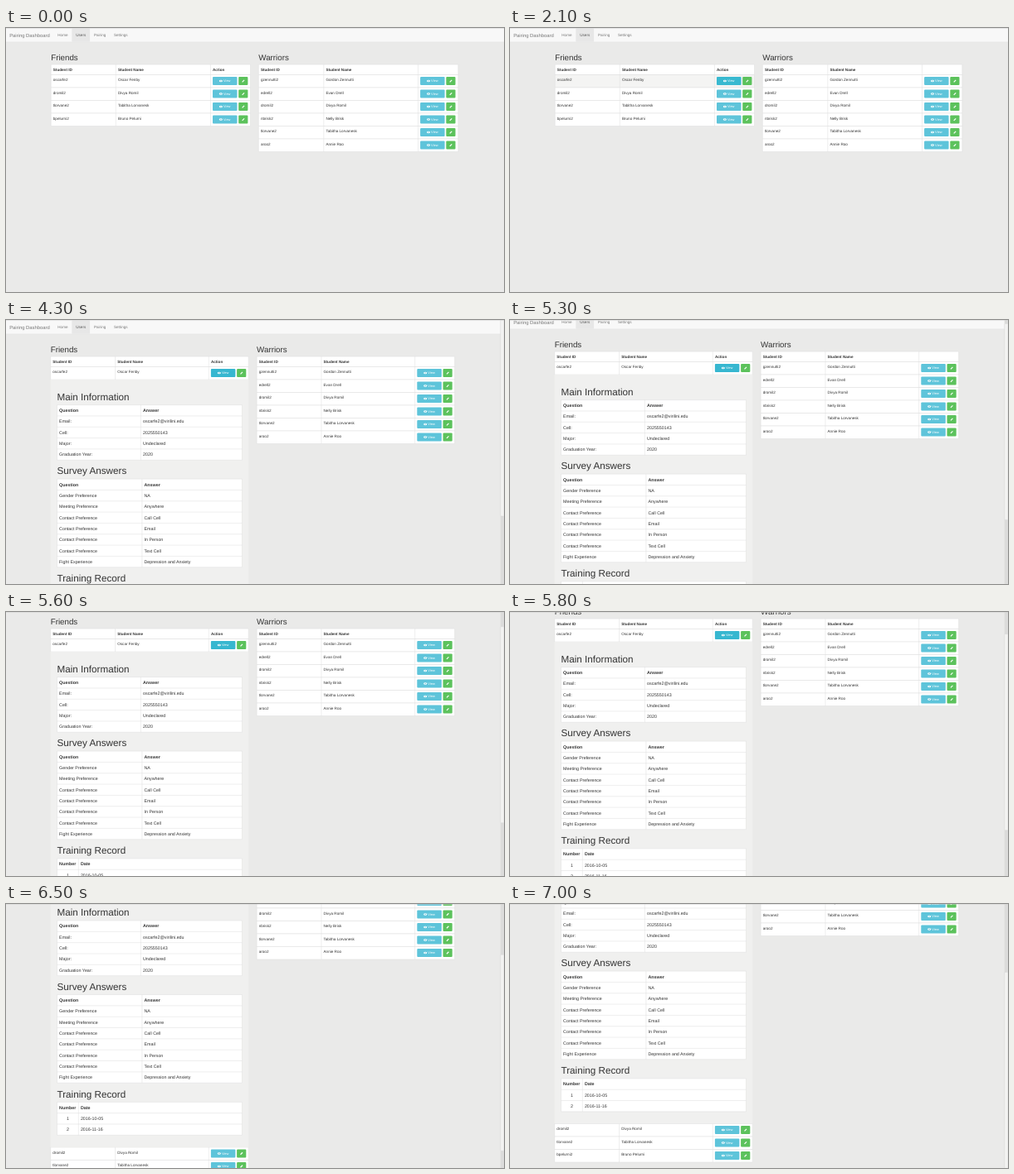
Write an HTML page that moves like this. It is 600x319 px and loops after 8 s.

```html
<!DOCTYPE html>
<html lang="en">
<head>
<meta charset="utf-8">
<title>Pairing Dashboard</title>
<style>
  html, body { margin: 0; width: 100%; height: 100%; overflow: hidden; background: #eaeae9; }
  svg { display: block; }
  text {
    font-family: "Liberation Sans", Arial, sans-serif;
    text-rendering: geometricPrecision;
    fill: #333;
    white-space: pre;
  }
</style>
</head>
<body>
<svg id="stage" width="600" height="319" viewBox="0 0 600 319"></svg>
<script>
const stage = document.getElementById('stage');
const LOOP = 8000, VIEW_H = 319;
const TOP = 44.1, HEAD = 12.4, ROW = 15.5, PAD = 2.6;
const SMALL = 4.62, BODY = 5.33, BODY_ROW = 13.33;
const PANEL_Y = 72, PANEL_H = 304.5;
const LINE = '#dcdcdc';

const friends = [
  ['oscarfe2', 'Oscar Fenby'],
  ['dromil2', 'Divya Romil'],
  ['tlorvane2', 'Tabitha Lorvanesk'],
  ['bpelurni2', 'Bruno Pelurni']
];
const warriors = [
  ['gzennutti2', 'Gordon Zennutti'],
  ['edrell2', 'Evan Drell'],
  friends[1],
  ['nbrisk2', 'Nelly Brisk'],
  friends[2],
  ['aroo2', 'Annie Roo']
];
const mainInfo = [
  ['Question', 'Answer'],
  ['Email:', 'oscarfe2@virilini.edu'],
  ['Cell:', '2025550143'],
  ['Major:', 'Undeclared'],
  ['Graduation Year:', '2020']
];
const survey = [
  ['Question', 'Answer'],
  ['Gender Preference', 'NA'],
  ['Meeting Preference', 'Anywhere'],
  ['Contact Preference', 'Call Cell'],
  ['Contact Preference', 'Email'],
  ['Contact Preference', 'In Person'],
  ['Contact Preference', 'Text Cell'],
  ['Fight Experience', 'Depression and Anxiety']
];
const training = [
  ['Number', 'Date'],
  ['1', '2016-10-05'],
  ['2', '2016-11-16']
];

// Column edges without and with the scrollbar
const wide = {
  friends: [54.2, 132.3, 246.4, 294.5],
  warriors: [304.3, 382.8, 496.5, 544.8],
  splits: [163.4, 165.4]
};
const narrow = {
  friends: [53.7, 131.6, 244.3, 292.2],
  warriors: [302.1, 379.9, 492.7, 540.6],
  splits: [162.4, 163.9]
};

const rect = (x, y, w, h, fill, extra = '') =>
  `<rect x="${x}" y="${y}" width="${w}" height="${h}" fill="${fill}" ${extra}/>`;

// cy is the middle of the line box
const text = (x, cy, str, size, extra = '') =>
  `<text x="${x}" y="${cy + size * 0.3465}" font-size="${size}" ${extra}>${str}</text>`;

const bold = 'font-weight="bold"';

function grid(xs, ys) {
  const x0 = xs[0], x1 = xs[xs.length - 1], y0 = ys[0], y1 = ys[ys.length - 1];
  const d = ys.map(y => `M${x0} ${y}H${x1}`).join('') + xs.map(x => `M${x} ${y0}V${y1}`).join('');
  return `<path d="${d}" stroke="${LINE}" stroke-width=".5" fill="none"/>`;
}

function buttons(x, y, blue) {
  const cy = y + 4.95;
  return rect(x, y, 29.5, 9.9, blue, 'rx="1"') +
    `<ellipse cx="${x + 9.9}" cy="${cy}" rx="2" ry="1.3" fill="#fff"/>` +
    `<circle cx="${x + 9.9}" cy="${cy - 0.1}" r=".65" fill="${blue}"/>` +
    text(x + 13, cy, 'View', 3.95, 'style="fill:#fff"') +
    rect(x + 31.2, y, 11.2, 9.9, '#5cc25c', 'rx="1"') +
    `<path d="M${x + 35.6} ${cy + 1.3}l2.5 -2.5" stroke="#fff" stroke-width="1.2"/>`;
}

function userRow(cols, y, user, state = {}) {
  const [a, b, c, d] = cols, cy = y + 6.2;
  return rect(a, y, d - a, ROW, state.hover ? '#f4f4f3' : '#fff') +
    text(a + PAD, cy, user[0], SMALL) +
    text(b + PAD, cy, user[1], SMALL) +
    buttons(c + PAD, y + 2.6, state.blue || '#5ec4da') +
    grid(cols, [y, y + ROW]);
}

function userHead(cols, title, last) {
  const [a, b, c, d] = cols, cy = TOP + 6.1;
  return text(a, 35.5, title, 9.77) +
    rect(a, TOP, d - a, HEAD, '#fff') +
    text(a + PAD, cy, 'Student ID', SMALL, bold) +
    text(b + PAD, cy, 'Student Name', SMALL, bold) +
    text(c + PAD, cy, last, SMALL, bold) +
    grid(cols, [TOP, TOP + HEAD]);
}

function infoTable(title, baseline, cols, rows, centred) {
  const [a, b, c] = cols, y = baseline + 5.7;
  const ys = [...rows, 0].map((_, i) => y + i * BODY_ROW);
  const cells = rows.map(([key, value], i) => {
    const cy = ys[i] + 6.6, weight = i ? '' : bold;
    const first = centred && i
      ? text((a + b) / 2, cy, key, BODY, 'text-anchor="middle"')
      : text(a + PAD, cy, key, BODY, weight);
    return first + text(b + PAD, cy, value, BODY, weight);
  });
  return `<text x="${a}" y="${baseline}" font-size="11.7">${title}</text>` +
    rect(a, y, c - a, rows.length * BODY_ROW, '#fff') + cells.join('') + grid(cols, ys);
}

function panel(layout, h) {
  const [l, , , r] = layout.friends, a = l + 7.8, c = r - 7.8;
  const [s1, s2] = layout.splits;
  return `<svg y="${PANEL_Y}" width="600" height="${h}" viewBox="0 ${PANEL_Y} 600 ${h}">` +
    rect(l, PANEL_Y, r - l, h, '#f0f0ef') +
    infoTable('Main Information', 96.9, [a, s1, c], mainInfo) +
    infoTable('Survey Answers', 186.4, [a, s2, c], survey) +
    infoTable('Training Record', 316.2, [a, a + 25.8, c], training, true) +
    '</svg>';
}

function navbar() {
  const grey = 'style="fill:#777"';
  return rect(0, 0, 600, 17.1, '#e2e2e2') + rect(0, 0, 600, 16.7, '#f8f8f8') +
    rect(79.4, 0.4, 21.7, 16.3, '#e7e7e7') +
    text(4.2, 8.6, 'Pairing Dashboard', 5.87, grey) +
    text(62.3, 8.6, 'Home', 4.57, grey) +
    text(84.3, 8.6, 'Users', 4.57, 'style="fill:#555"') +
    text(106, 8.6, 'Pairing', 4.57, grey) +
    text(130, 8.6, 'Settings', 4.57, grey);
}

function scrollbar(scroll, pageH) {
  const k = VIEW_H / pageH;
  return rect(595.7, 0, 4.3, VIEW_H, '#dcdcdb') +
    rect(595.9, scroll * k, 4, VIEW_H * k, '#f3f3f2', 'rx=".6" stroke="#d0d0d0" stroke-width=".3"');
}

function page({ open, scroll, hover, blue }) {
  const pageH = 125 + PANEL_H * open;
  const long = pageH > VIEW_H;
  const layout = long ? narrow : wide;
  const h = PANEL_H * open, y0 = TOP + HEAD;
  const left = friends.map((user, i) =>
    userRow(layout.friends, y0 + i * ROW + (i ? h : 0), user, i ? {} : { hover, blue }));
  const right = warriors.map((user, i) => userRow(layout.warriors, y0 + i * ROW, user));
  return `<g transform="translate(0 ${-scroll})">` + navbar() +
    userHead(layout.friends, 'Friends', 'Action') + left.join('') +
    (open ? panel(layout, h) : '') +
    userHead(layout.warriors, 'Warriors', '') + right.join('') + '</g>' +
    (long ? scrollbar(scroll, pageH) : '') +
    rect(0, 0, 600, 0.5, '#cfcfcf');
}

// Steps of [time, value]
const openSteps = [[0, 0], [3100, 0.464], [3200, 0.85], [3300, 0.985], [3400, 1]];
const blueSteps = [[0, '#5ec4da'], [2100, '#38b9d0'], [2200, '#33b5cc'], [4300, '#37b7d0']];
const scrollPath = [[5300, 6], [5800, 36], [6200, 65.5], [7000, 111]];

const held = (steps, t) => steps.filter(s => s[0] <= t).pop()[1];

function scrollAt(t) {
  if (t < scrollPath[0][0]) return 0;
  const i = scrollPath.findIndex(p => p[0] > t);
  if (i < 0) return scrollPath[scrollPath.length - 1][1];
  const [t0, v0] = scrollPath[i - 1], [t1, v1] = scrollPath[i];
  return v0 + (v1 - v0) * (t - t0) / (t1 - t0);
}

let shown = -1;
const start = performance.now();

function tick() {
  const t = Math.floor((performance.now() - start) % LOOP / 100) * 100;
  if (t !== shown) {
    shown = t;
    stage.innerHTML = page({
      open: held(openSteps, t),
      scroll: scrollAt(t),
      hover: t >= 500 && t < 4300,
      blue: held(blueSteps, t)
    });
  }
  requestAnimationFrame(tick);
}
tick();
</script>
</body>
</html>
```
